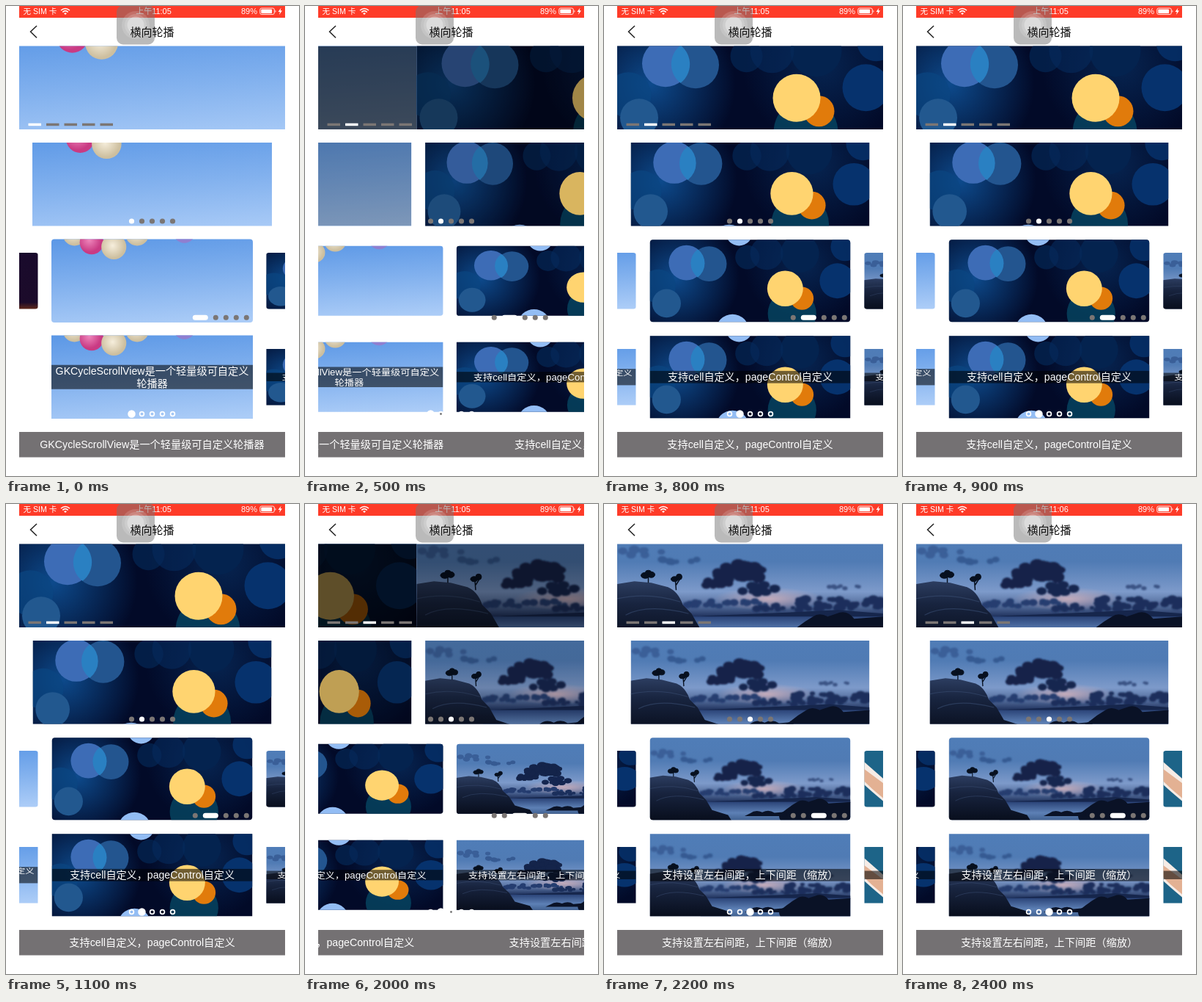
Write an HTML page that moves like this. It is 400 by 640 pixels and loops after 2.5 s.

```html
<!DOCTYPE html>
<html lang="zh-CN">
<head>
<meta charset="utf-8">
<title>横向轮播</title>
<style>
html, body { margin: 0; width: 100%; height: 100%; overflow: hidden; background: #fff; }
svg { display: block; width: 100%; height: 100%; }
text { font-family: "Liberation Sans", "Noto Sans CJK SC", "Noto Sans CJK", sans-serif; }
.mid { text-anchor: middle; }
.cap { font-size: 14.2px; fill: #fff; text-anchor: middle; }
.status { font-size: 11px; fill: #fff; }
</style>
</head>
<body>
<svg id="stage" viewBox="0 0 400 640">
  <defs id="defs">
    <linearGradient id="day" x1=".35" y1="0" x2=".5" y2="1">
      <stop offset="0" stop-color="#5c98e6"/><stop offset=".5" stop-color="#82b1ee"/><stop offset="1" stop-color="#abccf7"/>
    </linearGradient>
    <linearGradient id="dusk" x1="0" y1="0" x2="0" y2="1">
      <stop offset="0" stop-color="#4f7db8"/><stop offset=".3" stop-color="#507bb4"/>
      <stop offset=".55" stop-color="#7d9aca"/><stop offset=".68" stop-color="#4c6492"/><stop offset=".76" stop-color="#1d2f5a"/>
    </linearGradient>
    <linearGradient id="sea" x1="0" y1="0" x2="0" y2="1">
      <stop offset="0" stop-color="#2b4478"/><stop offset=".5" stop-color="#5d80b5"/><stop offset="1" stop-color="#33527f"/>
    </linearGradient>
    <linearGradient id="rock" x1="0" y1="0" x2="0" y2="1">
      <stop offset="0" stop-color="#2c3d60"/><stop offset=".35" stop-color="#18243f"/><stop offset="1" stop-color="#060b18"/>
    </linearGradient>
    <linearGradient id="night" x1="0" y1="0" x2="0" y2="1">
      <stop offset="0" stop-color="#190a2c"/><stop offset=".85" stop-color="#1c0b2a"/><stop offset="1" stop-color="#7a3414"/>
    </linearGradient>
    <radialGradient id="glow"><stop offset="0" stop-color="#0d4a8c"/><stop offset="1" stop-color="#0d4a8c" stop-opacity="0"/></radialGradient>
    <radialGradient id="sun"><stop offset="0" stop-color="#d9b5bd" stop-opacity=".8"/><stop offset="1" stop-color="#d9b5bd" stop-opacity="0"/></radialGradient>
    <radialGradient id="pink" cx=".4" cy=".4"><stop offset="0" stop-color="#ee86bb"/><stop offset="1" stop-color="#c93a83"/></radialGradient>
    <radialGradient id="cream" cx=".45" cy=".45"><stop offset="0" stop-color="#f6eedc"/><stop offset="1" stop-color="#cdbf9f"/></radialGradient>
    <filter id="soft" x="-20%" y="-20%" width="140%" height="140%"><feGaussianBlur stdDeviation="1.1"/></filter>
    <clipPath id="screen"><rect x="18" y="0" width="363" height="640"/></clipPath>

    <g id="img0">
      <rect x="-183" y="-82" width="366" height="164" fill="url(#day)"/>
      <circle cx="-140" cy="-84" r="21" fill="url(#cream)"/>
      <circle cx="58" cy="-88" r="20" fill="#8f7fd0"/>
      <circle cx="-27" cy="-84" r="21" fill="url(#cream)"/>
      <circle cx="-109" cy="-69" r="21.5" fill="url(#pink)"/>
      <circle cx="-69" cy="-61" r="22.5" fill="url(#cream)"/>
    </g>

    <g id="img1">
      <rect x="-183" y="-82" width="366" height="164" fill="#020a28"/>
      <circle cx="-135" cy="-5" r="115" fill="url(#glow)"/>
      <circle cx="100" cy="-30" r="110" fill="url(#glow)" opacity=".4"/>
      <g id="bokeh"></g>
    </g>

    <g id="img2">
      <rect x="-183" y="-82" width="366" height="164" fill="url(#dusk)"/>
      <ellipse cx="25" cy="18" rx="75" ry="16" fill="url(#sun)"/>
      <g id="clouds" filter="url(#soft)"></g>
      <path d="M-60 41L60 36 120 33 183 38V44H-90Z" fill="#16264c"/>
      <rect x="-90" y="42" width="273" height="40" fill="url(#sea)"/>
      <path d="M60 60Q72 50 86 42 94 36 106 42L118 38Q132 32 142 45L183 42V82H60Q45 66 60 60Z" fill="#0a1226"/>
      <path d="M0 63Q10 55 22 61 34 55 44 62L66 60V68H-10Z" fill="#0a1226"/>
      <path d="M-183-2L-158-6-135-4-112 2Q-98 8-92 26L-80 38-69 57-40 66-30 82H-183Z" fill="url(#rock)"/>
      <path d="M-183 18Q-140 8-95 22M-170 40Q-140 24-84 38" fill="none" stroke="#3a4d72" stroke-width="1.2" opacity=".6"/>
      <g fill="#07101f" stroke="#07101f">
        <path d="M-139-4V-14M-101 6L-102-7M-101-1L-96-9" stroke-width="1.5" fill="none"/>
        <ellipse cx="-143" cy="-14" rx="6" ry="4"/><ellipse cx="-135" cy="-15" rx="5" ry="4"/><ellipse cx="-139" cy="-18" rx="4" ry="3"/>
        <ellipse cx="-103" cy="-9" rx="5" ry="3.5"/><ellipse cx="-97" cy="-12" rx="4" ry="4"/>
      </g>
    </g>

    <g id="img3">
      <rect x="-183" y="-82" width="366" height="164" fill="#1d6488"/>
      <path d="M-190-54L-140 2V62L-166 34-190 6Z" fill="#f6ece6"/>
      <path d="M-190-34L-140 14V54L-166 26-190-4Z" fill="#e3b193"/>
    </g>

    <g id="img4"><rect x="-183" y="-82" width="366" height="164" fill="url(#night)"/></g>
  </defs>

  <g clip-path="url(#screen)">
    <rect x="18" width="363" height="16" fill="#fe3b28"/>
    <g class="status">
      <text x="23.5" y="11" font-size="10.6">无 SIM 卡</text>
      <text id="clock" class="mid" x="201.5" y="11"></text>
      <text x="321" y="11">89%</text>
    </g>
    <path d="M75 6Q81 1 87 6M77.3 8.3Q81 5 84.7 8.3" fill="none" stroke="#fff" stroke-width="1.6"/>
    <path d="M79 10Q81 8.3 83 10L81 12Z" fill="#fff"/>
    <rect x="346.8" y="3" width="19.5" height="8.4" rx="2" fill="none" stroke="#fff" stroke-width=".9"/>
    <rect x="348.3" y="4.5" width="14.8" height="5.4" rx="1" fill="#fff"/>
    <path d="M367.5 5.5Q369.5 7.2 367.5 9ZM375.5 2.5L371.5 8H374L373 12 377 6.3H374.6Z" fill="#fff"/>
    <path d="M42 27L33.5 35 42 43.2" fill="none" stroke="#222" stroke-width="1.5"/>
    <rect x="151" y="-1" width="52" height="53.5" rx="9" fill="#777" opacity=".5"/>
    <g fill="#fff">
      <circle cx="177" cy="26" r="19" opacity=".14"/>
      <circle cx="177" cy="26" r="15" opacity=".16"/>
      <circle cx="177" cy="26" r="11.5" opacity=".3"/>
    </g>
    <text class="mid" x="199.5" y="40.6" font-size="15" font-weight="500" fill="#111">横向轮播</text>
    <g id="rows"></g>
    <rect x="18" y="580" width="363" height="34.5" fill="#747173"/>
    <g id="ticker"></g>
    <g id="dots"></g>
  </g>
</svg>
<script>
const LOOP = 2500, STEP = 100, CENTER = 199.5, FULL = 363, H = 113.5;
const starts = [500, 2000];
const captions = [
  ['GKCycleScrollView是一个轻量级可自定义', '轮播器'],
  ['支持cell自定义，pageControl自定义'],
  ['支持设置左右间距，上下间距（缩放）'],
  ['']
];
// lead: how far ahead of the first visible step the scroll began
const rows = [
  { y: 54.5, w: 363, lead: 171, inset: 0, dim: 1 },
  { y: 186, w: 327, lead: 171, inset: 19, dim: .4 },
  { y: 317.5, w: 275, lead: 151, inset: 18.5, shrink: true, radius: 4, wrap: true },
  { y: 448.5, w: 275, lead: 151, inset: 18.5, shrink: true, caption: true }
];
const ticker = { lead: 142 };

const $ = id => document.getElementById(id);
const set = (el, attrs) => { for (const k in attrs) el.setAttribute(k, attrs[k]); };
function add(parent, tag, attrs = {}, text = '') {
  const el = document.createElementNS('http://www.w3.org/2000/svg', tag);
  set(el, attrs);
  el.textContent = text;
  return parent.appendChild(el);
}

function paintBokeh() {
  const disc = (cx, cy, r, fill, opacity = 1) => add($('bokeh'), 'circle', { cx, cy, r, fill, opacity });
  disc(90, -50, 35, '#04234f');
  disc(-5, -43, 22, '#04234f', .8);
  disc(30, -50, 30, '#052a5c', .6);
  disc(-166, 10, 31, '#0b4682', .7);
  disc(76, 60, 44, '#064a66', .75);
  disc(158, 0, 32, '#06326d');
  disc(172, -62, 26, '#06326d', .8);
  disc(-74.5, -31, 32, '#23558f');
  disc(-115.5, -33, 32, '#3d6cb6');
  add($('bokeh'), 'path', { d: 'M-95-57.5A32 32 0 0 1-95-6.5A32 32 0 0 1-95-57.5Z', fill: '#2a80c2' });
  disc(-151.5, 41, 26, '#22588f');
  disc(94, 32, 21, '#e17b0b');
  disc(63.5, 14, 32.5, '#ffd470');
  disc(-20, -88, 24, '#93bdf4');
  disc(-32, 91, 30, '#93bdf4');
}

function paintClouds() {
  let seed = 7;
  const rnd = () => (seed = seed * 16807 % 2147483647) / 2147483647;
  const puff = (x, y, w, h, n, fill, size) => {
    for (let i = 0; i < n; i++) {
      const a = rnd() * 2 * Math.PI, r = Math.sqrt(rnd()), s = size * (.6 + rnd() * .6);
      add($('clouds'), 'ellipse', { cx: x + Math.cos(a) * r * w, cy: y + Math.sin(a) * r * h, rx: s * 1.3, ry: s, fill });
    }
  };
  puff(-150, -46, 30, 5, 8, '#3a5f98', 5);
  puff(-95, -34, 30, 4, 8, '#365a92', 4);
  puff(-50, 24, 80, 4, 26, '#253d70', 4);
  puff(120, 24, 70, 8, 34, '#1b2f5c', 5);
  puff(60, 30, 60, 4, 18, '#1b2f5c', 4);
  puff(-14, -18, 33, 11, 34, '#14244a', 7);
  puff(-44, -2, 18, 6, 14, '#14244a', 5);
  puff(10, 4, 26, 6, 18, '#152650', 5);
  puff(130, 2, 26, 2, 9, '#3a5384', 3);
}

function buildRow(row, n) {
  const box = { x: -row.w / 2, y: -H / 2, width: row.w, height: H };
  const clip = add($('defs'), 'clipPath', { id: 'clip' + n });
  add(clip, 'rect', { ...box, rx: row.radius || 0 });
  row.slides = [];
  for (let i = row.wrap ? -1 : 0; i < 4; i++) {
    const g = add($('rows'), 'g');
    const body = add(g, 'g', { 'clip-path': `url(#clip${n})` });
    add(body, 'use', { href: '#img' + (i + 5) % 5, transform: `scale(${row.w / FULL})` });
    const slide = { i, g };
    if (row.dim) slide.shade = add(body, 'rect', box);
    if (row.caption) {
      const lines = captions[i], height = lines.length > 1 ? 33 : 17;
      add(body, 'rect', { ...box, y: -height / 2, height, opacity: .56 });
      lines.forEach((s, k) => add(body, 'text', { class: 'cap', y: 5.2 + 17 * (k - (lines.length - 1) / 2) }, s));
    }
    row.slides.push(slide);
  }
}

function buildDots() {
  const make = (tag, attrs) => Array.from({ length: 5 }, () => add($('dots'), tag, attrs));
  return {
    bars: make('rect', { y: 159.7, width: 17.5, height: 3.5 }),
    discs: make('circle', { cy: 293, r: 3.6 }),
    pills: make('rect', { y: 420.8, height: 7, rx: 3.5 }),
    rings: make('circle', { cy: 555.5, stroke: '#fff', 'stroke-width': 1.7 }),
    spot: add($('dots'), 'circle', { cy: 555.5, r: 1.4, fill: '#777' })
  };
}

const smoother = u => u * u * u * (u * (6 * u - 15) + 10);
function position(t, lead) {
  return starts.reduce((sum, s) => sum + (t < s ? 0 : smoother(Math.min(1, (t - s + lead) / 300))), 0);
}

function placeRow(row, t) {
  const pos = position(t, row.lead);
  for (const { i, g, shade } of row.slides) {
    const d = i - pos, far = Math.min(1, Math.abs(d));
    const inset = row.inset ? Math.max(i > 0 ? .8 : 0, row.inset * far) : 0;
    const sx = 1 - 2 * inset / row.w, sy = row.shrink ? 1 - 2 * inset / H : 1;
    set(g, {
      transform: `translate(${CENTER + d * row.w} ${row.y + H / 2}) scale(${sx} ${sy})`,
      visibility: Math.abs(d) < 1.6 ? 'visible' : 'hidden'
    });
    if (shade) set(shade, { opacity: row.dim * far });
  }
}

function placeDots(t) {
  const page = starts.filter(s => t >= s).length;
  const moving = starts.includes(t);
  const ringPage = moving ? page - 1 : page;
  for (let i = 0; i < 5; i++) {
    const on = i === page, big = i === ringPage;
    const fill = on ? '#fff' : '#7b7674', x = 171.5 + 14 * i;
    set(dots.bars[i], { x: 30.5 + 24.5 * i, fill });
    set(dots.discs[i], { cx: x, fill });
    set(dots.pills[i], { x: 254.8 + 14 * (i > page ? i + 1 : i), width: on ? 21 : 7, fill });
    set(dots.rings[i], { cx: x, r: big ? 4.4 : 2.9, fill: big ? '#fff' : 'none' });
  }
  set(dots.spot, { cx: 171.5 + 14 * page, visibility: moving ? 'visible' : 'hidden' });
}

function render(ms) {
  const t = Math.floor(ms % LOOP / STEP) * STEP;
  $('clock').textContent = t < 2400 ? '上午11:05' : '上午11:06';
  rows.forEach(row => placeRow(row, t));
  const pos = position(t, ticker.lead);
  ticker.items.forEach((el, i) => set(el, { x: CENTER + (i - pos) * FULL }));
  placeDots(t);
}

paintBokeh();
paintClouds();
rows.forEach(buildRow);
ticker.items = captions.map(c => add($('ticker'), 'text', { class: 'cap', y: 602.3 }, c.join('')));
const dots = buildDots();

const begin = performance.now();
function tick() {
  render(performance.now() - begin);
  requestAnimationFrame(tick);
}
tick();
</script>
</body>
</html>
```
